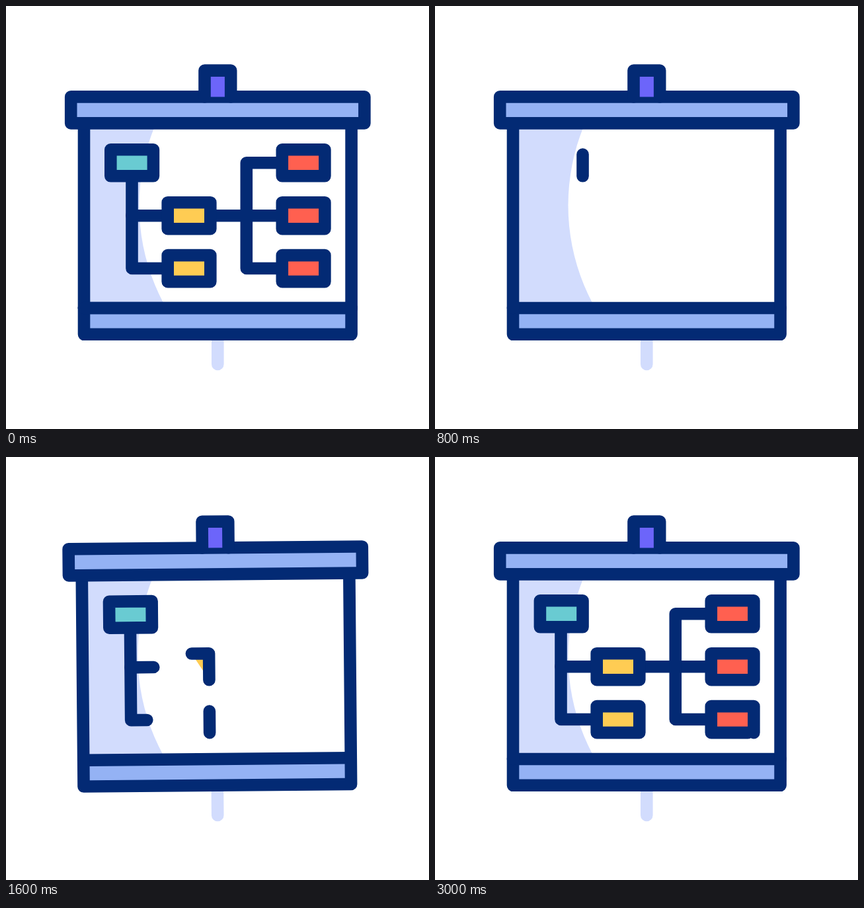
Animation of 640 by 640 pixels, one loop 3240 ms. Source, as an HTML page with a canvas:

```html
<!DOCTYPE html>
<html lang="en">
<head>
<meta charset="utf-8">
<title>Presentation board</title>
<style>
  html, body { margin: 0; width: 100%; height: 100%; overflow: hidden; background: #fff; }
  canvas { display: block; width: 640px; height: 640px; }
</style>
</head>
<body>
<canvas width="640" height="640"></canvas>
<script>
const ctx = document.querySelector('canvas').getContext('2d');
const LOOP = 3240, STEP = 40, DRAW = 640, WIPE = 800;
const NAVY = '#032a74', PALE = '#d2dcfd', BLUE = '#94b2f4', PURPLE = '#6c65fa';
const TEAL = '#69cbd2', YELLOW = '#ffcc53', RED = '#ff6050';
const LINE = 18.6, NODE_W = 64.6, NODE_H = 40;

// time, degrees
const SWING = [[1000, 0], [1240, 2], [1480, -2], [1720, 1], [1960, 0]];

// start time, points
const LINKS = [
  [1120, [[190.5, 257.3], [190.5, 397], [245, 397]]],
  [1220, [[190.5, 317.2], [245, 317.2]]],
  [1640, [[309.4, 317.2], [418, 317.2]]],
  [2000, [[418, 237.3], [363.8, 237.3], [363.8, 397], [418, 397]]]
];

// start time, left, top, fill
const NODES = [
  [640, 158.3, 217.3, TEAL],
  [1360, 244.7, 297.2, YELLOW],
  [1440, 244.7, 377.1, YELLOW],
  [1920, 417.8, 297.2, RED],
  [2120, 417.8, 217.3, RED],
  [2440, 417.8, 377.1, RED]
];

const clamp = x => Math.min(1, Math.max(0, x));
const ease = x => { x = clamp(x); return x * x * (3 - 2 * x); };

function swingAngle(t) {
  for (let i = 1; i < SWING.length; i++) {
    const [t0, a] = SWING[i - 1], [t1, b] = SWING[i];
    if (t >= t0 && t < t1) return a + (b - a) * ease((t - t0) / (t1 - t0));
  }
  return 0;
}

// Draws the first part of a polyline; a fill closes the drawn part.
function trim(points, part, fill) {
  const lens = points.slice(1).map((p, i) => Math.hypot(p[0] - points[i][0], p[1] - points[i][1]));
  let left = part * lens.reduce((a, b) => a + b, 0);
  ctx.beginPath();
  ctx.moveTo(...points[0]);
  for (let i = 0; i < lens.length && left > 0; i++) {
    const k = Math.min(1, left / lens[i]);
    const [x0, y0] = points[i], [x1, y1] = points[i + 1];
    ctx.lineTo(x0 + (x1 - x0) * k, y0 + (y1 - y0) * k);
    left -= lens[i];
  }
  if (fill) {
    ctx.fillStyle = fill;
    ctx.fill();
  }
  ctx.stroke();
}

function diagram(t, shift) {
  const part = start => ease((t - start) / DRAW);
  for (const [start, points] of LINKS) {
    if (t > start) trim(points, part(start));
  }
  for (const [start, left, y, fill] of NODES) {
    if (t <= start) continue;
    const x = left + (fill === TEAL ? shift : 0);
    const r = x + NODE_W, b = y + NODE_H;
    trim([[r, b], [r, y], [x, y], [x, b], [r, b]], part(start), fill);
  }
}

function box(x0, y0, x1, y1, fill) {
  ctx.beginPath();
  ctx.rect(x0, y0, x1 - x0, y1 - y0);
  ctx.fillStyle = fill;
  ctx.fill();
  ctx.stroke();
}

function sheet() {
  ctx.save();
  ctx.beginPath();
  ctx.rect(118, 177, 404.6, 280);
  ctx.clip();
  ctx.fillStyle = PALE;
  ctx.fillRect(118, 177, 405, 280);
  ctx.fillStyle = '#fff';
  ctx.beginPath();
  ctx.arc(517.5, 301.6, 316, 0, 2 * Math.PI);
  ctx.fill();
  ctx.restore();
}

function rollUp(t) {
  const y = 457 - 287 * ease(t / WIPE);
  ctx.save();
  ctx.beginPath();
  ctx.rect(0, 0, 640, y + LINE / 2);
  ctx.clip();
  diagram(Infinity, 0);
  ctx.restore();
  trim([[118, y], [522.6, y]], 1);
}

function render(t) {
  ctx.setTransform(1, 0, 0, 1, 0, 0);
  ctx.fillStyle = '#fff';
  ctx.fillRect(0, 0, 640, 640);
  ctx.translate(320, 551);
  ctx.rotate(swingAngle(t) * Math.PI / 180);
  ctx.translate(-320, -551);
  ctx.lineWidth = LINE;
  ctx.lineCap = ctx.lineJoin = 'round';

  ctx.strokeStyle = PALE;
  trim([[320.3, 490], [320.3, 542]], 1);

  ctx.strokeStyle = NAVY;
  sheet();
  box(118, 457, 522.6, 496.8, BLUE);
  trim([[118, 177], [118, 457]], 1);
  trim([[522.6, 177], [522.6, 457]], 1);
  diagram(t, 0.6);
  if (t < WIPE) rollUp(t);

  box(98.2, 137.4, 542.4, 177.4, BLUE);
  trim([[300.5, 137.4], [300.5, 97.6], [340.2, 97.6], [340.2, 137.4]], 1, PURPLE);
}

const begin = performance.now();
function tick() {
  const t = (performance.now() - begin) % LOOP;
  render(Math.floor(t / STEP) * STEP);
  requestAnimationFrame(tick);
}
tick();
</script>
</body>
</html>
```
